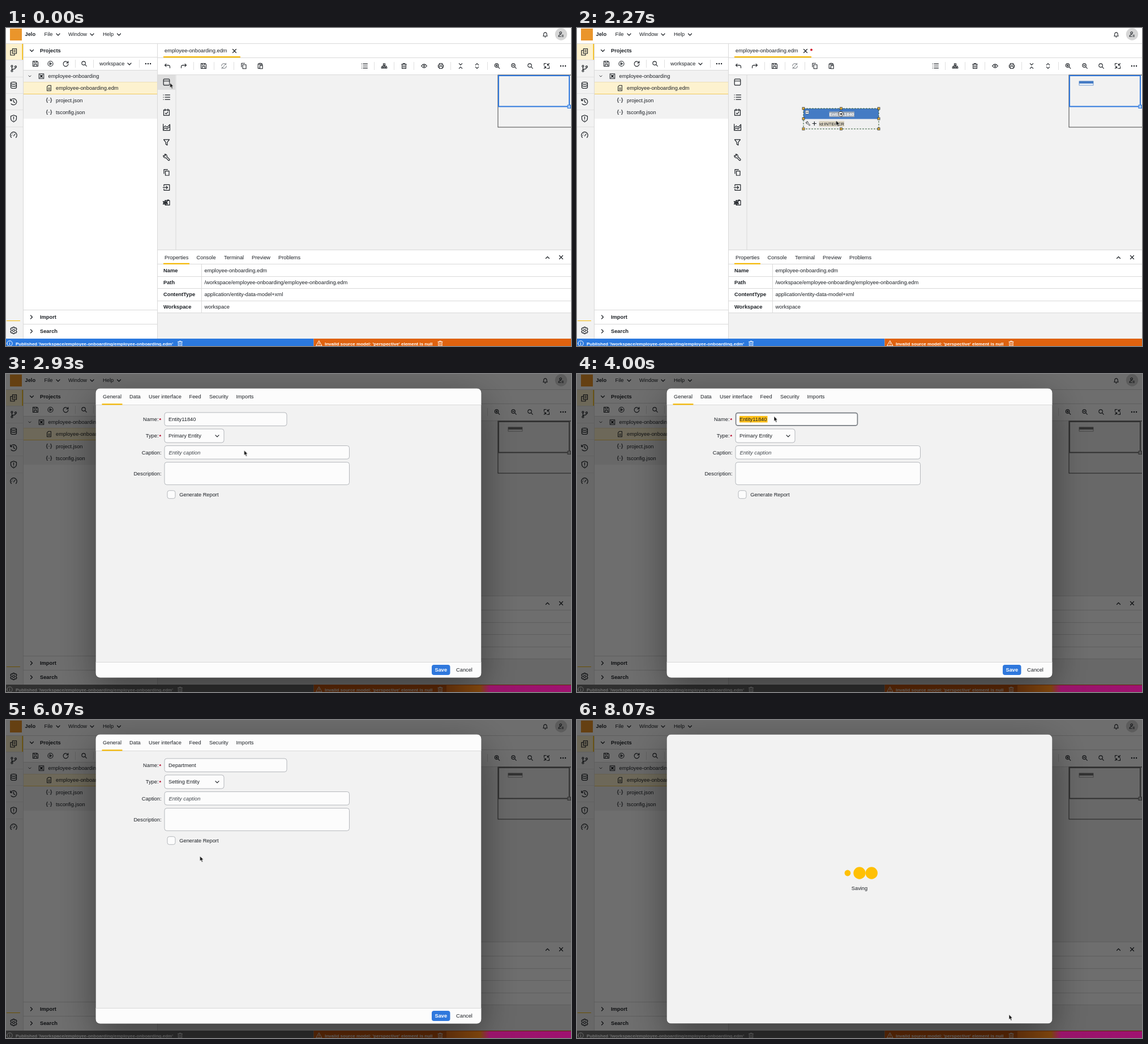
These frames come from a looping animation (998 px wide and 561 px high, 8.14 s). An HTML page:

```html
<!DOCTYPE html>
<html lang="en">
<head>
<meta charset="utf-8">
<title>Entity editor</title>
<style>
html, body { margin: 0; width: 100%; height: 100%; overflow: hidden; background: #f2f2f2; }
svg { display: block; width: 100%; height: 100%; }
text { font: 9.3px "Liberation Sans", Arial, sans-serif; fill: #1d2126; white-space: pre; }
.b { font-weight: 700; }
.s { font-size: 8px; }
.w { fill: #fff; }
.r { text-anchor: end; }
.m { text-anchor: middle; }
.i { font-style: italic; fill: #40464c; }
.red { fill: #b3092a; }
.icon { fill: none; stroke: #1d2126; stroke-width: 1.2; stroke-linejoin: round; stroke-linecap: round; }
.icon.pale { stroke: #8b8f93; }
.icon.light { stroke: #fff; stroke-width: 1; }
.field rect { fill: #fcfcfc; stroke: #a4a8ad; stroke-width: .8; }
.shadow { filter: blur(34px); }

.hover, .dropped, .arrow, .cross, .modal, .raw, .form, .saving, .focus, .marked, .default, .before, .after, .grey, .key, .pointer {
  animation: 8140ms step-end infinite;
}
.pointer { animation-name: move; animation-timing-function: ease-in-out; }
.hover { animation-name: hover; }
.dropped { animation-name: dropped; }
.arrow { animation-name: arrow; }
.cross { animation-name: cross; }
.modal { animation-name: modal; }
.raw { animation-name: raw; }
.form { animation-name: form; }
.saving { animation-name: saving; }
.focus { animation-name: focus; }
.marked { animation-name: marked; }
.default { animation-name: default-name; }
.before { animation-name: before; }
.after { animation-name: after; }
.grey { animation-name: grey; }
.key { visibility: hidden; animation-name: typed; }

@keyframes hover { 0% { opacity: 1 } 2.5%, 100% { opacity: 0 } }
@keyframes dropped { 0% { opacity: 0 } 9.8%, 100% { opacity: 1 } }
@keyframes arrow { 0% { opacity: 1 } 9.8% { opacity: 0 } 14%, 100% { opacity: 1 } }
@keyframes cross { 0% { opacity: 0 } 9.8% { opacity: 1 } 14%, 100% { opacity: 0 } }
@keyframes modal { 0% { opacity: 0 } 28.5%, 100% { opacity: 1 } }
@keyframes raw { 0% { opacity: 1 } 31%, 100% { opacity: 0 } }
@keyframes form { 0% { opacity: 0 } 31% { opacity: 1 } 97.35%, 100% { opacity: 0 } }
@keyframes saving { 0% { opacity: 0 } 97.35%, 100% { opacity: 1 } }
@keyframes focus { 0% { opacity: 0 } 49.1% { opacity: 1 } 64.7%, 100% { opacity: 0 } }
@keyframes marked { 0% { opacity: 0 } 49.1% { opacity: 1 } 50%, 100% { opacity: 0 } }
@keyframes default-name { 0% { opacity: 1 } 50%, 100% { opacity: 0 } }
@keyframes typed { 0% { visibility: hidden } 50%, 100% { visibility: visible } }
@keyframes before { 0% { opacity: 1 } 73.7%, 100% { opacity: 0 } }
@keyframes after { 0% { opacity: 0 } 73.7%, 100% { opacity: 1 } }
@keyframes grey { 0% { filter: none } 28.5%, 100% { filter: grayscale(1) } }
@keyframes move {
  0%, .86% { transform: translate(289.5px, 96.5px) }
  9%, 13.2% { transform: translate(400.5px, 148px) }
  20%, 27.9% { transform: translate(457.5px, 163px) }
  28.5%, 32.8% { transform: translate(455.5px, 163.5px) }
  40.9%, 60.6% { transform: translate(348px, 74.5px) }
  65.5%, 69.6% { transform: translate(345px, 105px) }
  73.3%, 77% { transform: translate(342.5px, 240px) }
  80.2%, 82.6% { transform: translate(639.5px, 434px) }
  92.5% { transform: translate(763px, 518.5px) }
  93.4%, 100% { transform: translate(763px, 519.5px) }
}
</style>
</head>
<body>
<script>
const rect = (x, y, w, h, fill, more = '') => `<rect x="${x}" y="${y}" width="${w}" height="${h}" fill="${fill}" ${more}/>`;
const text = (x, mid, str, cls = '') => `<text x="${x}" y="${mid + 3.3}" class="${cls}">${str}</text>`;
const icon = (x, y, d, cls = '', k = 1) => `<path class="icon ${cls}" transform="translate(${x} ${y}) scale(${k})" d="${d}"/>`;
const group = (cls, ...parts) => `<g class="${cls}">${parts.join('')}</g>`;
const hline = (x, y, w, c = '#d9d9d9') => rect(x, y, w, 1, c);
const vline = (x, y, h, c = '#d9d9d9') => rect(x, y, 1, h, c);
const circle = (x, y, r, more) => `<circle cx="${x}" cy="${y}" r="${r}" ${more}/>`;
const gold = '#f5b800';

// Icon outlines, centred on 0,0 in a box of about 12 units.
const disc = (r, x = 0, y = 0) => `M${x - r} ${y}a${r} ${r} 0 1 0 ${2 * r} 0a${r} ${r} 0 1 0 ${-2 * r} 0`;
const lens = disc(3.6, -1, -1) + 'M1.8 1.8L4.8 4.8';
const P = {
  down: 'M-3-1.5L0 1.5 3-1.5', up: 'M-3 1.5L0-1.5 3 1.5', right: 'M-1.5-3L1.5 0-1.5 3',
  close: 'M-3-3L3 3M3-3L-3 3',
  save: 'M-5-5H3L5-3V5H-5ZM-2.5-5V-2H2V-5M-2.5 5V1H2.5V5',
  run: disc(5) + 'M-1.4-2.2V2.2L2.2 0Z',
  reload: 'M4.6-1.5A4.9 4.9 0 1 0 4.9 1M4.9-5V-1.5H1.5',
  lens,
  undo: 'M-2.2-4.2L-5-1.5L-2.2 1.2M-5-1.5H2Q5-1.5 5 1.5V3.8',
  redo: 'M2.2-4.2L5-1.5L2.2 1.2M5-1.5H-2Q-5-1.5-5 1.5V3.8',
  sync: 'M-4.8 0A4.8 4.8 0 0 1 3.6-3.2M4.8 0A4.8 4.8 0 0 1-3.6 3.2M4-5.4V-2.8H1.4M-4 5.4V2.8H-1.4M-1.5 1L1.5-1',
  copy: 'M-2-2.5H4.5V5.2H-2ZM-4.5 2V-5.2H2',
  paste: 'M-2.2-4.2H-4.2V4.6H-1M2.2-4.2H4V-2M-2-5.2H2V-3H-2ZM-.6-1H4.6V5.2H-.6Z',
  list: 'M-5.5-4h.3M-2.5-4H6M-5.5 0h.3M-2.5 0H6M-5.5 4h.3M-2.5 4H6',
  tree: 'M-1.7-4.8H1.7V-1.8H-1.7ZM0-1.8V2M-4 2V0H4V2M-5.3 2H-2.7V4.5H-5.3ZM-1.3 2H1.3V4.5H-1.3ZM2.7 2H5.3V4.5H2.7Z',
  trash: 'M-4.8-3.4H4.8M-1.8-3.4V-5H1.8V-3.4M-3.8-3.4V5H3.8V-3.4M-1.4-1V3M1.4-1V3',
  eye: 'M-5.5 0Q0-7 5.5 0Q0 7-5.5 0' + disc(1.3),
  print: 'M-3-2V-5H3V-2M-3 2.5H-5V-2H5V2.5H3M-3 .8H3V5H-3Z',
  shrink: 'M-3-4.8L0-1.8 3-4.8M-3 4.8L0 1.8 3 4.8', grow: 'M-3-1.8L0-4.8 3-1.8M-3 1.8L0 4.8 3 1.8',
  zoomIn: lens + 'M-2.8-1H.8M-1-2.8V.8', zoomOut: lens + 'M-2.8-1H.8',
  fit: 'M5-5L1.5-1.5M1.5-4.5V-1.5H4.5M-5 5L-1.5 1.5M-4.5 1.5H-1.5V4.5M-5-1V-5H-1M5 1V5H1',
  win: 'M-4-5.3H4Q5.3-5.3 5.3-4V4Q5.3 5.3 4 5.3H-4Q-5.3 5.3-5.3 4V-4Q-5.3-5.3-4-5.3ZM-5.3-2H5.3',
  task: 'M-5-4H5V5.5H-5ZM-2.5-5.8V-2.5M2.5-5.8V-2.5M-2.2 1.6L-.5 3L2.4-.4',
  chart: 'M-5.8-5.5V5.5H6V-5M-5.8 1L-2-2.5L1 0L6-5M-5.8 4L-2 1L1 3L6-1.5',
  filter: 'M-5-4.8H5L1.3 0V5L-1.3 3.4V0Z',
  wrench: 'M-5.5-3.4A3.3 3.3 0 0 0-1.2 .6L3.4 5.4Q5.8 5.8 5.4 3.4L.6-1.2A3.3 3.3 0 0 0-3.4-5.5L-1.8-3.6L-3.4-2Z',
  enter: 'M-4.5-2.4V-5H5.3V5H-4.5V2.4M-6 0H2M-.5-2.5L2 0L-.5 2.5',
  puzzle: 'M-1-3.5H5.5V4.5H-1M1.5-4.5H4M-6-2L-3.6-1L-2.3-4L-1-1L1.6-2L.5 .3L2 2.5L-.8 2L-2 4.5L-3.5 2.2L-6 3L-4.8 .5ZM-4 .5H0M-3-1.5L-1 2.5M-1-1L-3 2',
  docs: 'M-2-5.5H5V3H-2ZM-2-2.5H-5.5V6H1.5V3M.3-2.8H2.8M.3-.2H2.8',
  branch: disc(1.5, -3, -4) + disc(1.5, -3, 4.3) + disc(1.5, 3.5, -3) + 'M-3-2.5V2.8M3.5-1.5Q3.5 1-3 1.5',
  data: 'M-5-3.5A5 2 0 0 1 5-3.5A5 2 0 0 1-5-3.5V3.7A5 2 0 0 0 5 3.7V-3.5M-5 0A5 2 0 0 0 5 0',
  clock: 'M-5.3-2A5.5 5.5 0 1 1-4.5 3.4M-5.6-5V-2H-2.6M0-3V.3L2.4 1.6',
  shield: 'M0-5.8L5-4V0Q5 4 0 6Q-5 4-5 0V-4ZM0-3V.8M0 3h.1',
  gauge: 'M-4 4.2A5.7 5.7 0 1 1 4 4.2M0 1.5L2.6-2M-3.4 .4h.1M-1.6-2.4h.1',
  gear: disc(2) + 'M-1.2-5.8H1.2L1.8-4L4-4.6L5.6-2.4L4.3-.8V.8L5.6 2.4L4 4.6L1.8 4L1.2 5.8H-1.2L-1.8 4L-4 4.6L-5.6 2.4L-4.3 .8V-.8L-5.6-2.4L-4-4.6L-1.8-4Z',
  bell: 'M-4 3Q-3 2-3-1A3 3 0 0 1 3-1Q3 2 4 3ZM-1 5H1',
  user: disc(2, -1, -2.7) + 'M-5 4.5Q-5 .8-1 .8M-5 4.5H-.5M1.5 2H4.5M1.5 4.5H4.5',
  box: 'M-5-5H5V5H-5ZM-3-3L3 3M3-3L-3 3' + disc(1.8),
  file: 'M-1.5-5.5H4V5.5H-4V-3ZM-1.7 0H2M-1.7 2.6H2',
  json: 'M-3-4.5Q-4.5-4.5-4.5-2.5Q-4.5 0-5.5 0Q-4.5 0-4.5 2.5Q-4.5 4.5-3 4.5M3-4.5Q4.5-4.5 4.5-2.5Q4.5 0 5.5 0Q4.5 0 4.5 2.5Q4.5 4.5 3 4.5M-1.2 0h.1M1.2 0h.1',
  info: disc(4.7) + 'M0-.5V2.5M0-2.4h.1',
  warn: 'M0-4.5L5 4.2H-5ZM0-1.4V1.2M0 2.8h.1'
};
const icons = (y, places, k = .9) => Object.entries(places).map(([n, x]) => icon(x, y, P[n], n === 'sync' ? 'pale' : '', k)).join('');
const column = (x, y, step, names, k) => names.split(' ').map((n, j) => icon(x, y + j * step, P[n], '', k)).join('');
const seps = (y, xs) => xs.map(x => vline(x, y, 14, '#e0e0e0')).join('');
const menu = (x, cx, s) => text(x, 11, s) + icon(cx, 11.5, P.down);
const more = (x, y) => [-4.1, 0, 4.1].map(dx => circle(x + dx, y, 1.2, 'fill="#1d2126"')).join('');

const header = group('',
  rect(0, 0, 998, 27, '#fff'), hline(0, 27, 998),
  rect(7, 1, 21, 21, '#ea952b'), text(33.5, 11, 'Jelo', 'b'),
  menu(67.5, 92, 'File'), menu(110, 152, 'Window'), menu(171, 199.5, 'Help'),
  icon(952.5, 11.5, P.bell, '', .9), circle(980.5, 11, 10.7, 'fill="#d6d6d6"'), icon(980.5, 11, P.user, '', .9));

const rail = group('',
  rect(0, 28, 30, 520, '#f2f2f2'), rect(0, 28, 30, 28, '#fdf1cd'), rect(28.5, 28, 1.8, 28, gold),
  [56, 86, 115, 144, 174].map(y => hline(0, y, 30, '#e0e0e0')).join(''),
  vline(30, 28, 520), column(13.5, 42, 29.4, 'docs branch data clock shield gauge'),
  hline(1, 516, 24, gold), icon(13.5, 533.5, P.gear));

const row = (y, type, name) => icon(76, y, P[type], '', .85) + text(88, y, name);
const projects = group('',
  rect(31, 28, 236, 520, '#fff'), vline(267, 28, 520),
  icon(45.5, 40, P.down), text(60, 40, 'Projects', 'b'), hline(31, 51, 236),
  icons(63, { save: 52, run: 78.5, reload: 105.5, lens: 138 }), seps(56, [122, 154, 235]),
  text(165, 63, 'workspace'), icon(218, 63.5, P.down), more(251, 63), hline(31, 74, 236),
  rect(31, 75, 236, 85, '#f2f2f2'),
  icon(42, 85, P.down, '', .7), icon(62.5, 85, P.box, '', .85), text(74.5, 85, 'employee-onboarding'),
  rect(31, 95, 236, 21, '#fdf2cf'), hline(31, 95, 236, '#ecdfb8'), hline(31, 116, 236, '#f0c95c'),
  row(106, 'file', 'employee-onboarding.edm'), row(127.3, 'json', 'project.json'), row(148.5, 'json', 'tsconfig.json'),
  hline(31, 497, 236), icon(45, 510, P.right), text(60, 510, 'Import', 'b'),
  hline(31, 522, 236), icon(45, 535, P.right), text(60, 535, 'Search', 'b'));

const minimap = group('grey',
  rect(869, 83, 131, 92, '#f2f2f2', 'stroke="#333" stroke-width=".9"'),
  group('dropped', rect(887, 94, 25, 7, '#f0f4fa', 'stroke="#447bc4" stroke-width=".7"'), rect(887, 93.7, 25, 4.3, '#447bc4')),
  rect(870, 84, 125, 54.5, 'none', 'stroke="#2f78dd" stroke-width="2"'),
  rect(992, 136, 5.5, 5.5, '#a9cdf8', 'stroke="#2f78dd"'));

const editor = group('',
  rect(268, 28, 730, 54, '#fff'), text(280, 40, 'employee-onboarding.edm'), icon(403.5, 40.5, P.close),
  group('dropped', circle(414, 38.5, 2, 'fill="#d32030"')),
  hline(268, 52, 730), rect(278, 50, 136, 2.2, gold),
  icons(67, { undo: 285, redo: 314, save: 349, sync: 385, copy: 420, paste: 449, list: 633, tree: 668, trash: 703, eye: 738.5,
    print: 768, shrink: 803, grow: 832, zoomIn: 867.5, zoomOut: 897, lens: 926, fit: 955 }),
  more(984, 67), seps(60, [331, 367, 402, 650, 685, 720, 785, 850]), hline(268, 82, 730),
  rect(268, 83, 730, 308, '#f2f2f2'),
  group('hover', rect(268, 83, 31, 26, '#dedede')), vline(299.5, 83, 308),
  column(283.5, 95.5, 26.55, 'win list task chart filter wrench copy enter puzzle'),
  minimap);

const knobs = [400, 466.5, 533].map(x => [142, 160, 178].filter(y => x !== 466.5 || y !== 160)
  .map(y => rect(x - 2, y - 2, 4, 4, '#e9b63c', 'stroke="#333" stroke-width=".8"')).join('')).join('');
const entity = group('dropped',
  rect(400, 142, 133, 36, '#f0f0f0'), rect(400, 142, 133, 18.5, '#447bc4'),
  rect(445.5, 147.5, 44.5, 9.5, '#9fa9b6'), text(445.5, 151.6, 'Entity11840', 'b s w'),
  rect(403.5, 145.5, 6, 6, '#fff', 'stroke="#456" stroke-width=".6"'), icon(406.5, 148.5, 'M-1.6 0H1.6'),
  circle(466, 151.7, 4.3, 'fill="#fff" stroke="#222"'), icon(466, 151.7, 'M-2.2 0H2M.4-1.6L2 0L.4 1.6'),
  icon(408, 168.5, P.wrench, '', .65), icon(419.3, 168.5, 'M-3.2 0H3.2M0-3.2V3.2'),
  rect(427.5, 164, 44.5, 10, '#ddd5c2'), text(427.7, 168.6, 'Id:INTEGER', 's'),
  rect(400, 142, 133, 36, 'none', 'stroke="#345f3a" stroke-dasharray="3 2"'), knobs);

const properties = [['Name', 'employee-onboarding.edm'], ['Path', '/workspace/employee-onboarding/employee-onboarding.edm'],
  ['ContentType', 'application/entity-data-model+xml'], ['Workspace', 'workspace']];
const panel = group('',
  rect(268, 391, 730, 157, '#f2f2f2'), rect(268, 391, 730, 111, '#fff'), hline(268, 391, 730),
  text(280, 404.5, 'Properties'), text(336.5, 404.5, 'Console'), text(385, 404.5, 'Terminal'),
  text(434, 404.5, 'Preview'), text(481, 404.5, 'Problems'),
  icon(956.5, 405, P.up), icon(980.5, 404.5, P.close), hline(268, 416, 730), rect(278, 414.7, 46, 2.2, gold),
  properties.map(([k, v], j) => {
    const y = 427.5 + j * 21.25;
    return text(278, y, k, 'b') + text(350.5, y, v) + hline(268, Math.round(y + 10.5), 730);
  }).join(''), vline(345, 417, 85));

const status = group('',
  group('grey', rect(0, 548, 543.5, 13, '#2b79df'), icon(6.5, 556.5, P.info, 'light'),
    text(17, 556.6, "Published '/workspace/employee-onboarding/employee-onboarding.edm'", 'b s w'), icon(307.5, 556.5, P.trash, 'light', .85)),
  rect(543.5, 548, 455, 13, '#df620f'), icon(553, 556.5, P.warn, 'light'),
  text(563, 556.6, "Invalid source model: 'perspective' element is null", 'b s w'), icon(767, 556.5, P.trash, 'light', .85));

// Unstyled labels: rows parted by "|" or a line break, cells by "&", each with an optional x before "@".
const plain = `Name|Type|Caption|Description
272@Generate Report
Name|Description
272@Required
272@Calculated
272@Calculated property expression for <tspan class="b">Create</tspan>
272@Calculated property expression for <tspan class="b">Update</tspan>
Database name|Databse count|Databse query|Database name|Data type|Order by
Length&388@Precision&615@Scale
274.5@Primary key&388@Auto increment&501.5@Not null&615@Unique
Default value||169@Title|169@Tooltip|169@Icon
169@Menu key&391@Menu label&612.5@Menu index
169@Layout type|169@Perspective|169@Navigation||Widget type
Dropdown key&388@Dropdown value
Depends on Property&501.5@Depends on Entity
Value From&501.5@Filter By
Widget size&388@Length
Label&615@Short label
Pattern&388@Format&615@Tooltip
Section|Major type||169@Feed URL|169@Username|169@Password|169@Schedule|169@Path|||169@Property name`;
const raw = group('raw', text(158.5, 32.2, '{{state.busyText}}'),
  plain.split(/[\n|]/).map((line, j) => line.split('&').map(cell => {
    const [x, s] = cell.includes('@') ? cell.split('@') : [161.3, cell];
    return text(x, 43.4 + j * 10.64, s);
  }).join('')).join(''));

const label = (y, s, must) => text(must ? 269.5 : 274.5, y, s, 'r') + (must ? text(270.5, y + 1, '*', 'b red') : '');
const field = (y, w, h) => group('field', rect(280, y, w, h, '', 'rx="4"'));
const typed = [...'Department'].map((c, j) => `<tspan class="key" style="animation-delay:${j * 67}ms">${c}</tspan>`).join('');
const form = group('form',
  rect(158.5, 25.5, 681, 28.5, '#fcfcfc'), hline(158.5, 54, 681),
  [[171, 'General'], [218, 'Data'], [252, 'User interface'], [323.5, 'Feed'], [359, 'Security'], [406.5, 'Imports']]
    .map(([x, s]) => text(x, 40, s)).join(''),
  rect(169.5, 52.3, 36, 2.2, gold),
  label(79.5, 'Name:', 1), field(68, 216, 23.5),
  group('focus', rect(280.7, 68.7, 214.6, 22.1, 'none', 'rx="3.5" stroke="#777c82" stroke-width="1.4"')),
  group('marked', rect(287, 74, 49.5, 11.5, '#ffc01a')),
  group('default', text(287, 79.6, 'Entity11840')), text(287, 79.6, typed),
  label(109, 'Type:', 1), field(97, 105, 24), icon(373, 109.3, P.down),
  group('before', text(287, 109, 'Primary Entity')), group('after', text(287, 109, 'Setting Entity')),
  label(138.3, 'Caption:'), field(126.5, 326.5, 23.5), text(287.5, 138.3, 'Entity caption', 'i'),
  label(175.5, 'Description:'), field(155.7, 326.5, 39.6),
  group('field', rect(285, 205.7, 14, 14, '', 'rx="3.5"')), text(306.3, 212.6, 'Generate Report'),
  rect(158.5, 508, 681, 28, '#fcfcfc'), hline(158.5, 508, 681),
  rect(752, 513, 32.5, 18, '#2f78dd', 'rx="4"'), text(768.3, 522, 'Save', 'b w m'), text(795, 522, 'Cancel'));

const saving = group('saving',
  [[478, 5.4], [499, 10.7], [520.3, 10.7]].map(([x, r]) => circle(x, 270, r, 'fill="#ffc005"')).join(''),
  text(499, 296.5, 'Saving', 'm'));

const modal = group('modal',
  rect(0, 0, 998, 561, '#000', 'fill-opacity=".57"'),
  rect(158.5, 45, 681, 510, '#000', 'class="shadow" fill-opacity=".42"'),
  rect(778, 549, 220, 12, 'url(#tint)'),
  `<g clip-path="url(#sheet)">${rect(158.5, 25.5, 681, 510, '#f2f2f2')}${raw}${form}${saving}</g>`);

const pointer = group('pointer',
  group('arrow', '<path d="M0 0V9L2 7.2L3.5 10.7L5.2 10L3.7 6.6H6.5Z" fill="#111" stroke="#fff" stroke-width=".7"/>'),
  group('cross', icon(0, .5, 'M-4.5 0H4.5M0-4.5V4.5M-3-1.5L-4.5 0L-3 1.5M3-1.5L4.5 0L3 1.5M-1.5-3L0-4.5L1.5-3M-1.5 3L0 4.5L1.5 3')));

document.body.innerHTML = `<svg viewBox="0 0 998 561"><defs>
<clipPath id="sheet"><rect x="158.5" y="25.5" width="681" height="510" rx="8"/></clipPath>
<linearGradient id="tint"><stop stop-color="#5c2d0a"/><stop offset=".27" stop-color="#7a430c"/><stop offset=".35" stop-color="#98146a"/><stop offset="1" stop-color="#a01270"/></linearGradient>
</defs>${header}${rail}${projects}${editor}${entity}${panel}${status}${modal}${pointer}</svg>`;
</script>
</body>
</html>
```
